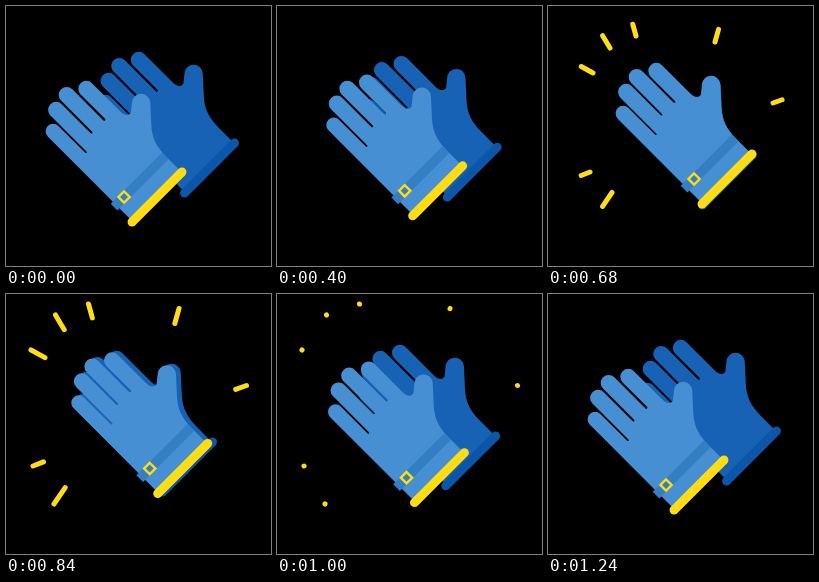
An HTML page that plays this animation: 265x260 px, repeating every 1.28 s.

```html
<!DOCTYPE html>
<html lang="en">
<head>
<meta charset="utf-8">
<title>Clapping gloves</title>
<style>
  html, body { margin: 0; width: 100%; height: 100%; overflow: hidden; background: #000; }
  svg { display: block; width: 100vw; height: 100vh; }
</style>
</head>
<body>
<svg viewBox="0 0 265 260">
  <defs>
    <path id="hand" d="M-34.5 0V-120a7.5 7.5 0 0 1 15 0V-82a.9 .9 0 0 0 1.8 0V-133a8 8 0 0 1 16 0V-92a1 1 0 0 0 2 0V-136a8 8 0 0 1 16 0V-92a1.1 1.1 0 0 0 2.2 0V-126.5a8 8 0 0 1 16 0V-86Q35 -77 41 -78L48.5 -84A9 9 0 0 1 62 -71.5L46.5 -54.5C38 -45 35 -36 35 -22V0Z"/>
    <path id="cuff" d="M-35.3 0H35.3" stroke-width="9" stroke-linecap="round"/>
  </defs>
  <g id="back">
    <use href="#hand" fill="#1762b4"/>
    <use href="#cuff" stroke="#0b56a8"/>
  </g>
  <g id="front">
    <use href="#hand" fill="#468fd2"/>
    <rect x="-37.5" y="-28" width="72.5" height="9.5" fill="#347fc3"/>
    <rect x="-27.3" y="-27.3" width="8" height="8" fill="#347fc3" stroke="#ffdc14" stroke-width="2.4"/>
    <use href="#cuff" stroke="#ffdc14"/>
  </g>
  <g id="sparks" stroke="#ffdc14" stroke-width="5" stroke-linecap="round"></g>
</svg>
<script>
const LOOP = 1280, STEP = 40;
const byId = id => document.getElementById(id);

// Each spark runs from its inner end to its outer end.
const sparks = [
  [45, 67, 25, 56], [62, 42, 49.5, 21], [88, 30, 82.5, 10], [167, 36, 173, 14.5],
  [225, 97, 240.5, 91.5], [42, 166, 27, 172], [64, 186.5, 48, 210]
].map(ends => {
  const line = document.createElementNS("http://www.w3.org/2000/svg", "line");
  byId("sparks").append(line);
  return { line, ends };
});

const ease = (t, start, end) => {
  const p = Math.min(1, Math.max(0, (t - start) / (end - start)));
  return (1 - Math.cos(Math.PI * p)) / 2;
};
const place = (id, x, y) =>
  byId(id).setAttribute("transform", `translate(${x} ${y}) rotate(-45)`);

function draw(t) {
  const closed = ease(t, 240, 640) - ease(t, 760, 1190);
  place("front", 151 + 28 * closed, 191 - 18 * closed);
  place("back", 203.5 - 24 * closed, 162 + 12 * closed);

  const head = ease(t, 580, 760), tail = ease(t, 740, 1010);
  byId("sparks").style.display = t >= 600 && t < 1040 ? "" : "none";
  for (const { line, ends: [x1, y1, x2, y2] } of sparks) {
    const set = (n, p) => {
      line.setAttribute("x" + n, x1 + (x2 - x1) * p);
      line.setAttribute("y" + n, y1 + (y2 - y1) * p);
    };
    set(1, tail);
    set(2, head + 0.001);
  }
}

const began = performance.now();
function tick() {
  const t = (performance.now() - began) % LOOP;
  draw(Math.floor(t / STEP) * STEP);
  requestAnimationFrame(tick);
}
tick();
</script>
</body>
</html>
```
